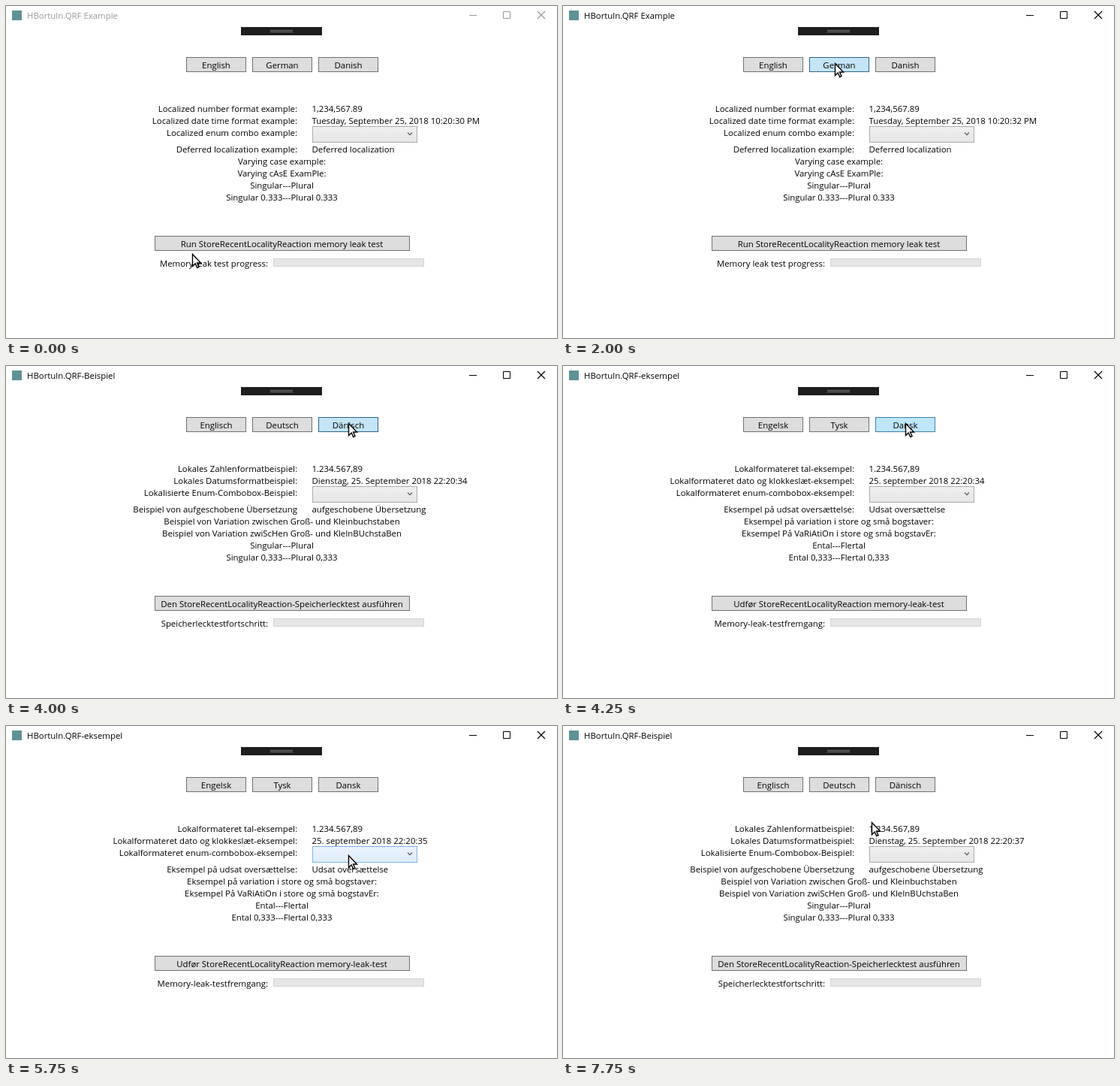
Recreate the animation shown at these times as an HTML page. Size 734 by 442 pixels, loop 8 s.

```html
<!DOCTYPE html>
<html lang="en">
<head>
<meta charset="utf-8">
<title>Localization example</title>
<style>
html, body { margin: 0; width: 100%; height: 100%; overflow: hidden; background: #fff; }
svg { display: block; width: 734px; height: 442px; }
text { font: 11.4px "Open Sans", "Noto Sans", sans-serif; fill: #000; white-space: pre; }
.end { text-anchor: end; }
.mid { text-anchor: middle; }
.button { fill: #ddd; stroke: #707070; }
.button.hover { fill: #bee6fd; stroke: #3c7fb1; }
.button.pressed { fill: #c4e5f6; stroke: #2c628b; }
.combo { fill: url(#idle); stroke: #acacac; }
.combo.hover { fill: url(#over); stroke: #7eb4ea; }
.combo.pressed { fill: url(#down); stroke: #569de5; }
#controls { fill: none; stroke: #000; }
.inactive #controls { stroke: #999; }
.inactive #title { fill: #999; }
</style>
</head>
<body>
<svg id="stage" viewBox="0 0 734 442">
  <defs>
    <linearGradient id="idle" x2="0" y2="1"><stop stop-color="#f0f0f0"/><stop offset="1" stop-color="#e5e5e5"/></linearGradient>
    <linearGradient id="over" x2="0" y2="1"><stop stop-color="#ecf4fc"/><stop offset="1" stop-color="#dcecfc"/></linearGradient>
    <linearGradient id="down" x2="0" y2="1"><stop stop-color="#daecfc"/><stop offset="1" stop-color="#c4e0fc"/></linearGradient>
  </defs>
  <rect x="8" y="6" width="13" height="13" fill="#5f9298"/>
  <g id="controls">
    <path d="M617 12.5h10M662.5 7.5h9v9h-9z"/>
    <path d="M708 7l10 10M718 7l-10 10" stroke-width="1.2"/>
  </g>
  <rect x="313" y="28" width="108" height="11" fill="#1e1e20"/>
  <path d="M352 32.5h30M352 34.5h30" stroke="#777"/>
  <g id="widgets"></g>
  <rect x="356.5" y="336.5" width="200" height="10" fill="#e6e6e6" stroke="#d4d4d4"/>
  <path d="M535 168.5l3 3 3-3" fill="none" stroke="#606060" stroke-width="1.3"/>
  <g id="labels"></g>
  <path id="cursor" d="M.5.5V16.5L4.2 13 6.7 18.5 9 17.5 6.6 12H11.5z" fill="#fff" stroke="#000" stroke-width="1.4"/>
</svg>
<script>
const STEP = 250, STEPS = 32;
const APP = 'HBortuln.QRF', TEST = 'StoreRecentLocalityReaction';
const stage = document.getElementById('stage');
const cursor = document.getElementById('cursor');

const add = (parent, tag, attrs) => {
  const el = document.createElementNS(stage.namespaceURI, tag);
  for (const name in attrs) el.setAttribute(name, attrs[name]);
  return document.getElementById(parent).appendChild(el);
};
const box = (x, y, width, height, name = 'button') =>
  add('widgets', 'rect', { x: x + .5, y: y + .5, width: width - 1, height: height - 1, class: name });
const label = (x, y, align, id) => add('labels', 'text', { x, y, class: align, ...(id && { id }) });

const widgets = {
  english: box(240, 68, 80, 20),
  german: box(328, 68, 80, 20),
  danish: box(416, 68, 80, 20),
  run: box(198, 306, 340, 20),
  combo: box(408, 160, 140, 22, 'combo')
};

// Same order as the strings of each language.
const labels = [
  label(28, 17, '', 'title'),
  ...[280, 368, 456].map(x => label(x, 83, 'mid')),
  ...[141, 157, 173, 195].map(y => label(388, y, 'end')),
  ...[141, 157, 195].map(y => label(407.5, y, '')),
  ...[211, 227, 243, 259].map(y => label(367.5, y, 'mid')),
  label(367.5, 321, 'mid'),
  label(349, 347, 'end')
];

const languages = {
  en: second => [
    `${APP} Example`, 'English', 'German', 'Danish',
    'Localized number format example:', 'Localized date time format example:',
    'Localized enum combo example:', 'Deferred localization example:',
    '1,234,567.89', `Tuesday, September 25, 2018 10:20:${second} PM`, 'Deferred localization',
    'Varying case example:', 'Varying cAsE ExamPle:',
    'Singular---Plural', 'Singular 0.333---Plural 0.333',
    `Run ${TEST} memory leak test`, 'Memory leak test progress:'
  ],
  de: second => [
    `${APP}-Beispiel`, 'Englisch', 'Deutsch', 'Dänisch',
    'Lokales Zahlenformatbeispiel:', 'Lokales Datumsformatbeispiel:',
    'Lokalisierte Enum-Combobox-Beispiel:', 'Beispiel von aufgeschobene Übersetzung',
    '1.234.567,89', `Dienstag, 25. September 2018 22:20:${second}`, 'aufgeschobene Übersetzung',
    'Beispiel von Variation zwischen Groß- und Kleinbuchstaben',
    'Beispiel von Variation zwiScHen Groß- und KleInBUchstaBen',
    'Singular---Plural', 'Singular 0,333---Plural 0,333',
    `Den ${TEST}-Speicherlecktest ausführen`, 'Speicherlecktestfortschritt:'
  ],
  da: second => [
    `${APP}-eksempel`, 'Engelsk', 'Tysk', 'Dansk',
    'Lokalformateret tal-eksempel:', 'Lokalformateret dato og klokkeslæt-eksempel:',
    'Lokalformateret enum-combobox-eksempel:', 'Eksempel på udsat oversættelse:',
    '1.234.567,89', `25. september 2018 22:20:${second}`, 'Udsat oversættelse',
    'Eksempel på variation i store og små bogstaver:',
    'Eksempel På VaRiAtiOn i store og små bogstavEr:',
    'Ental---Flertal', 'Ental 0,333---Flertal 0,333',
    `Udfør ${TEST} memory-leak-test`, 'Memory-leak-testfremgang:'
  ]
};

// Each row holds from its step until the next row.
const pointer = [
  [0, 248, 330], [1, 242, 280], [2, 250, 246], [3, 277, 158], [4, 266, 90],
  [5, 285, 74], [6, 402, 76], [8, 362, 76], [12, 408, 73], [13, 466, 70],
  [14, 456, 76], [18, 460, 74], [19, 424, 84], [20, 344, 84], [21, 440, 178],
  [22, 448, 176], [23, 456, 172], [24, 464, 170], [28, 377, 125],
  [29, 384, 90], [30, 384, 80], [31, 411, 128]
];
const hot = [
  [0], [5, 'english', 'hover'], [6, 'german', 'hover'], [8, 'german', 'pressed'],
  [9, 'german', 'hover'], [13, 'danish', 'hover'], [16, 'danish', 'pressed'],
  [17, 'danish', 'hover'], [20, 'german', 'hover'], [21, 'combo', 'hover'],
  [22, 'combo', 'pressed'], [23, 'combo', 'hover'], [28],
  [30, 'german', 'pressed'], [31]
];
const spoken = [[0, 'en'], [9, 'de'], [17, 'da'], [31, 'de']];

const rowAt = (table, step) => table.findLast(row => row[0] <= step);

function draw(step) {
  const [, x, y] = rowAt(pointer, step);
  const [, target, state] = rowAt(hot, step);
  const strings = languages[rowAt(spoken, step)[1]](30 + Math.floor(step / 4));
  cursor.setAttribute('transform', `translate(${x} ${y})`);
  stage.classList.toggle('inactive', step < 8);
  labels.forEach((el, i) => { el.textContent = strings[i]; });
  for (const name in widgets) {
    for (const look of ['hover', 'pressed']) {
      widgets[name].classList.toggle(look, name === target && look === state);
    }
  }
}

const start = performance.now();
let shown = 0;
draw(shown);
function tick() {
  const step = Math.floor((performance.now() - start) / STEP) % STEPS;
  if (step !== shown) draw(shown = step);
  requestAnimationFrame(tick);
}
requestAnimationFrame(tick);
</script>
</body>
</html>
```
